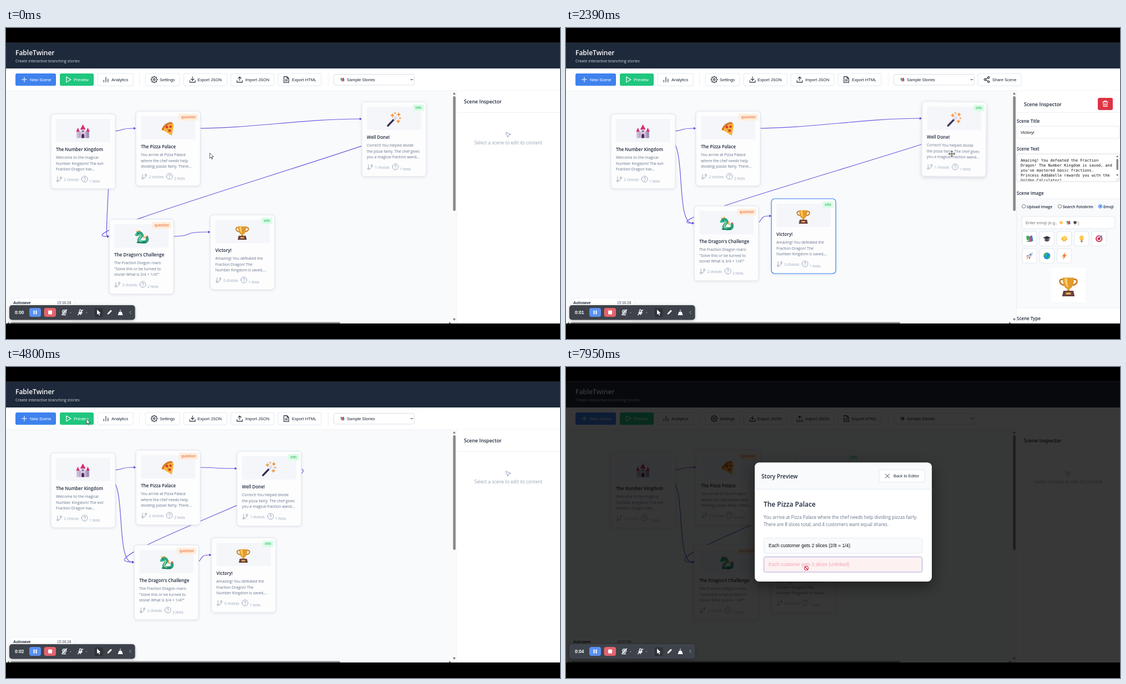
An HTML page that plays this animation: 998x561 px, repeating every 8 s.

```html
<!DOCTYPE html>
<html lang="en">
<head>
<meta charset="utf-8">
<title>Story editor</title>
<style>
html, body { margin: 0; width: 100%; height: 100%; overflow: hidden; background: #000; }
svg { display: block; width: 998px; height: 561px; }
text { font-family: "Open Sans", "Noto Sans", sans-serif; white-space: pre; }
.ui { font-family: "Liberation Sans", Arial, sans-serif; }
.mono { font-family: "DejaVu Sans Mono", monospace; }
.card.on .frame { stroke: #3b82f6; stroke-width: 1.2; }
.choice.hover rect { stroke: #7fb0ee; fill: #eff7fc; }
.choice.dead rect { fill: #fdf1f2; }
.choice.dead.hover rect { stroke: #a9a9d6; }
.modal { filter: drop-shadow(0 8px 12px rgba(0, 0, 0, .45)); }
.bar { filter: drop-shadow(0 1px 2px rgba(0, 0, 0, .3)); }
</style>
</head>
<body>
<svg id="stage" viewBox="0 0 998 561"></svg>
<script>
const INK = '#1e293b', GRAY = '#64748b', PALE = '#94a3b8', LINE = '#e2e8f0';
const LOOP = 8000;

// Drawing helpers
const text = (x, y, s, size, fill = INK, more = '') =>
  `<text x="${x}" y="${y}" font-size="${size}" fill="${fill}" ${more}>${s}</text>`;
const bold = (x, y, s, size, fill = INK) => text(x, y, s, size, fill, 'font-weight="600"');
const ui = (x, y, s, size = 7.5, fill = INK, more = '') => text(x, y, s, size, fill, `class="ui" ${more}`);
const rect = (x, y, w, h, fill, r = 0, stroke = 'none', more = '') =>
  `<rect x="${x}" y="${y}" width="${w}" height="${h}" rx="${r}" fill="${fill}" stroke="${stroke}" ${more}/>`;
const path = (d, fill, stroke = 'none', w = 1) =>
  `<path d="${d}" fill="${fill}" stroke="${stroke}" stroke-width="${w}" stroke-linecap="round" stroke-linejoin="round"/>`;
const dot = (x, y, r, fill, stroke = 'none') => `<circle cx="${x}" cy="${y}" r="${r}" fill="${fill}" stroke="${stroke}"/>`;
const ring = (x, y, r) => `M${x - r} ${y}a${r} ${r} 0 1 0 ${2 * r} 0a${r} ${r} 0 1 0 ${-2 * r} 0`;
const place = (x, y, k, body) => `<g transform="translate(${x} ${y}) scale(${k})">${body}</g>`;

const gear = 'M' + Array.from({ length: 32 }, (_, i) => {
  const a = (i - .5) * Math.PI / 16, r = i % 4 < 2 ? 10.5 : 8;
  return `${(12 + r * Math.cos(a)).toFixed(1)} ${(12 + r * Math.sin(a)).toFixed(1)}`;
}).join('L') + 'z';
const icons = {
  plus: 'M12 4v16M4 12h16',
  play: 'M6 3l15 9-15 9z',
  bars: 'M19 20V10M12 20V4M5 20v-6',
  gear: gear + ring(12, 12, 3),
  down: 'M12 3v12M7 10l5 5 5-5M3 15v6h18v-6',
  up: 'M12 15V3M7 8l5-5 5 5M3 15v6h18v-6',
  file: 'M14 2H4v20h16V8zM14 2v6h6M8 13h8M8 17h8',
  share: ring(18, 5, 3) + ring(6, 12, 3) + ring(18, 19, 3) + 'M8.6 13.5l6.8 4M15.4 6.5l-6.8 4',
  trash: 'M3 6h18M8 6V3h8v3M5 6l1 15h12l1-15M10 11v6M14 11v6',
  cross: 'M4 4l16 16M20 4L4 20',
  branch: 'M6 3v12M18 9a9 9 0 01-9 9' + ring(18, 6, 3) + ring(6, 18, 3),
  help: ring(12, 12, 10) + 'M9 9a3 3 0 116 1c0 2-3 2-3 4M12 17v.5',
  pointer: 'M3 3l7 17 2.5-7.5L20 10z',
  caret: 'M5 9l7 7 7-7',
  left: 'M15 5l-7 7 7 7',
  camera: ring(12, 10, 7) + ring(12, 10, 2.5) + 'M7 21h10M3 21L21 2',
  mic: 'M9 5a3 3 0 016 0v6a3 3 0 01-6 0zM6 11a6 6 0 0012 0M12 17v4M3 21L21 3'
};
const icon = (name, x, y, size = 12, color = INK, w = 2) =>
  place(x - size / 2, y - size / 2, size / 24, path(icons[name], 'none', color, w));

// Small pictures, drawn around 0,0 in a 32 unit box
const pics = {
  castle: rect(-12, 0, 24, 14, '#b8aac6') + rect(-5, -6, 10, 20, '#d5cadf') + rect(-14, -1, 6, 15, '#cabdd6') +
    rect(8, -1, 6, 15, '#a493b8') + path('M0-16l6 11H-6zM-11-9l4 9h-8zM11-9l4 9H7z', '#dc2f72') +
    path('M-3 14V8a3 3 0 016 0v6z', '#4c2a66') + dot(0, -1, 1.6, '#59377a'),
  pizza: path('M-13 1C-9-9 0-14 9-14l4 5-4 24z', '#f9b437') + path('M-14 2C-10-10 0-16 9-15l2 4C1-12-7-6-10 4z', '#d9782b') +
    dot(-2, -4, 3, '#d53b35') + dot(6, -5, 2.8, '#d53b35') + dot(4, 4, 3, '#d53b35') + dot(0, 1, 1, '#41a35a'),
  wand: path('M-13 14L5-5', 'none', '#37264f', 4) + path('M1-1l5-5', 'none', '#e8dff4', 4) +
    [[-3, -9, 1], [11, -11, 1], [10, 4, 1], [3, -14, .6], [14, -3, .6]].map(([x, y, k]) =>
      place(x, y, k, path('M0-5l1.5 3.5L5 0 1.5 1.5 0 5-1.5 1.5-5 0-1.5-1.5z', '#f4953f'))).join(''),
  dragon: path('M-9-10l-3-4 6 1 1-3 5 5zM2-4l5-2-1 5 4 1-4 3z', '#f4a13c') +
    path('M-8-8C0-12 4-5-1 0S-8 10 1 11s14-1 12-9', 'none', '#2ba37d', 6.5) + path('M-8 12h18', 'none', '#198268', 3.5) +
    path('M-5-5C0-6 1-2-2 1s-5 8 3 9', 'none', '#9bdc9a', 2) + path('M-14-6l7-5 5 3-2 5-8 1z', '#35b48a') +
    dot(-7, -8, 1.2, '#15354a') + path('M13 2l-2-5 5 1z', '#df4b56'),
  trophy: path('M-8-11c-9-2-7 9 2 9M8-11c9-2 7 9-2 9', 'none', '#c97f22', 2.5) +
    path('M-9-14H9C9-3 6 3 2 4v5h-4V4c-4-1-7-7-7-18z', '#e39b2c') + path('M-6-13h4c0 7 1 11 2 15-4-2-6-8-6-15z', '#fbcf6c') +
    path('M-8 7H8l2 9H-10z', '#6a3f3d') + rect(-4, 10, 8, 3, '#e8b658'),
  books: path('M-14-10l10-3 6 24-11 3z', '#3caa61') + path('M-2-10H8V13H-2z', '#e74856') +
    path('M4-12l7-1 4 22-9 3z', '#2b83d8') + path('M-12 9l9-3', 'none', '#fff', 3),
  cap: path('M0-11L16-4 0 4-16-4z', '#393444') + path('M-9 0v8c5 5 13 5 18 0V0L0 4z', '#544b62') + path('M12-4v11', 'none', '#e9a63a', 2.5),
  star: path('M0-14L4-6 12-9 9-2 15 3 7 5 6 13 0 9-6 13-7 5-15 3-9-2-12-9-4-6z', '#fbb735') + dot(0, 0, 5, '#ffdf69'),
  bulb: dot(0, -4, 9, '#ffc94d') + path('M-5 3H5L4 9H-4z', '#f0a63a') + rect(-4, 9, 8, 6, '#8a8796', 2),
  target: dot(0, 0, 14, '#d52e4c') + dot(0, 0, 9.5, '#fff') + dot(0, 0, 6, '#d52e4c') + path('M0 0L12-12', 'none', '#287bc9', 3),
  rocket: path('M14-14C3-14-5-6-8 3l5 5C6 5 14-3 14-14z', '#cfcbdc') + path('M-5-4l-9 5 6 2zM4 5l-5 9-2-6z', '#d83756') +
    path('M-8 4l-6 10 10-6z', '#f6a22f') + dot(4, -5, 3, '#3184cf'),
  globe: dot(0, 0, 14, '#238ede') + path('M-10-9C-3-16 6-12 3-7L-3-3l1 6-5 3-6-7zM5 0l8 1-4 9-5 1z', '#36b56a'),
  bolt: path('M4-15L-9 3h7l-4 13L10-4H2z', '#f87532')
};
const pic = (name, x, y, size) => place(x, y, size / 32, pics[name]);

// Story content
const hero = 'Princess Addabelle';
const scenes = {
  castle: { x: 81, y: 155, title: 'The Number Kingdom', choices: 2, hints: 1,
    lines: ['Welcome to the magical', 'Number Kingdom! The evil', 'Fraction Dragon has...'] },
  pizza: { x: 234, y: 150, title: 'The Pizza Palace', tag: 'question', choices: 2, hints: 2,
    lines: ['You arrive at Pizza Palace', 'where the chef needs help', 'dividing pizzas fairly. There...'] },
  wand: { x: 641, y: 133, title: 'Well Done!', tag: 'info', choices: 1, hints: 1,
    lines: ['Correct! You helped divide', 'the pizza fairly. The chef gives', 'you a magical fraction wand...'] },
  dragon: { x: 186, y: 345, title: "The Dragon's Challenge", tag: 'question', choices: 2, hints: 2,
    lines: ['The Fraction Dragon roars:', '"Solve this or be turned to', 'stone! What is 3/4 + 1/4?"'],
    full: ['The Fraction Dragon roars: "Solve this or', 'be turned to stone! What is 3/4 + 1/4?"'] },
  trophy: { x: 368, y: 337, title: 'Victory!', tag: 'info', choices: 0, hints: 1,
    lines: ['Amazing! You defeated the', 'Fraction Dragon! The', 'Number Kingdom is saved,...'],
    full: ['Amazing! You defeated the Fraction', 'Dragon! The Number Kingdom is saved, and', "you've mastered basic fractions.",
      `${hero} rewards you with the`, 'Golden Calculator!'] }
};
const links = [['castle', 'pizza', 31], ['castle', 'dragon', 48], ['pizza', 'wand', 31], ['wand', 'dragon', 31], ['dragon', 'trophy', 31]];

function card(id) {
  const s = scenes[id];
  const [tagX, tagFill, tagInk] = s.tag === 'info' ? [92, '#dcfce7', '#35bd6c'] : [77, '#ffeddc', '#ea7440'];
  return `<g id="${id}" class="card">` + rect(0, 0, 116, 135, '#fdfdfe', 6, '#dfe4ee', 'class="frame"') +
    rect(9, 9, 98, 42, '#f4f6fa', 3) + pic(id, 57.5, 32, 26) +
    (s.tag ? rect(tagX, 5, 112 - tagX, 12, tagFill, 3) +
      text((tagX + 112) / 2, 13.2, s.tag, 6.2, tagInk, 'font-weight="600" text-anchor="middle"') : '') +
    bold(9, 66.6, s.title, 8) + s.lines.map((l, i) => text(9, 81.3 + i * 10.4, l, 6.9, GRAY)).join('') +
    icon('branch', 15, 118, 12, PALE, 1.8) + text(23.5, 121, s.choices + ' choices', 6.2, PALE) +
    icon('help', 60.5, 117.5, 13, PALE, 1.8) + text(69, 124, s.hints + ' hints', 6.2, PALE) + '</g>';
}

const button = (x, w, name, label, iconX, labelX, fill = '#fff', ink = INK) =>
  rect(x, 82, w, 22.3, fill, 3, fill === '#fff' ? LINE : 'none') + icon(name, iconX, 93, 13, ink) + ui(labelX, 95.6, label, 7.5, ink);

function inspector(id) {
  const s = scenes[id];
  const radio = (x, label, on) => dot(x, 321.7, 3.2, '#fff', on ? '#2a72e8' : '#777') +
    (on ? dot(x, 321.7, 1.8, '#2a72e8') : '') + bold(x + 5.5, 324.5, label, 6.9);
  const choices = ['books', 'cap', 'star', 'bulb', 'target', 'rocket', 'globe', 'bolt'].map((n, i) => {
    const x = 822 + i % 5 * 31.3, y = i < 5 ? 367 : 398;
    return rect(x, y, 26, 26, '#fff', 3, LINE) + pic(n, x + 13, y + 13, 14);
  }).join('');
  return `<g id="edit-${id}">` + bold(825, 141, 'Scene Inspector', 8.9) +
    rect(958, 126, 27, 22, '#df3344', 3) + icon('trash', 971.5, 136.5, 13, '#fff') +
    bold(812, 170.5, 'Scene Title', 8) + rect(812, 177, 185.5, 22, '#fff', 3, LINE) + ui(819, 190.6, s.title, 7.5, '#111') +
    bold(812, 221, 'Scene Text', 8) + rect(812, 227, 185.5, 50, '#fff', 3, '#d8dde6') +
    `<g clip-path="url(#area)">${s.full.map((l, i) => text(819, 241.2 + i * 9, l, 6.85, '#111', 'class="mono"')).join('')}</g>` +
    (s.full.length > 4 ? rect(991.5, 236, 3.5, 20, '#8a8a8a', 1.7) + path('M991 233h4l-2-3zM991 264h4l-2 3z', '#666') : '') +
    path('M991 275l4-4M994 275l1-1', 'none', '#999', .6) +
    bold(812, 301, 'Scene Image', 8) + rect(812, 308, 190, 197, '#f8fafc', 4, '#edf0f6') +
    radio(824.5, 'Upload Image') + radio(889.5, 'Search Fotobrim') + radio(962.5, 'Emoji', true) +
    rect(821, 340, 167.5, 22, '#fff', 3, LINE) + ui(828, 353.7, 'Enter emoji (e.g.,', 7.5, '#777') +
    pic('star', 892, 351, 8) + pic('books', 905, 351, 8) + pic('cap', 917, 351, 8) + ui(922, 353.7, ')', 7.5, '#777') +
    choices + rect(874, 433, 62, 62, '#fff', 3) + pic(id, 905, 466, 36) + bold(812, 526.5, 'Scene Type', 8) +
    button(742, 78, 'share', 'Share Scene', 758, 768) + '</g>';
}

function modal(id, top, height, lines, options, firstY) {
  const row = ([label, dead], i) => {
    const y = firstY + i * 34;
    return `<g class="choice ${dead ? 'dead' : ''}" data-y="${y}">` + rect(356.5, y, 285, 27.5, '#f8fafc', 3, '#e6eaf2') +
      ui(365, y + 16.2, label, 8.5, dead ? '#f2a3b0' : '#111') + '</g>';
  };
  return `<g id="play-${id}" class="modal">` + rect(340, top, 319, height, '#fff', 8) +
    path(`M340 ${top + 48}v-40a8 8 0 018-8h303a8 8 0 018 8v40z`, '#f8fafc') + path(`M340 ${top + 48}h319`, 'none', LINE) +
    bold(352, top + 28, 'Story Preview', 10) + rect(564, top + 13, 82, 22, '#fff', 3, LINE) +
    icon('cross', 579, top + 24, 11) + ui(590, top + 26.6, 'Back to Editor', 7.4) +
    bold(356, top + 79, scenes[id].title, 11.95) +
    lines.map((l, i) => text(356, top + 101.2 + i * 13.6, l, 8.15, GRAY)).join('') + options.map(row).join('') + '</g>';
}

const arrow = 'M0 0v9l2.2-2 1.6 3.6 1.5-.7-1.6-3.4h3z';
const cross = 'M0-5.5V5.5M-5.5 0H5.5M-2-3.5l2-2 2 2M-2 3.5l2 2 2-2M-3.5-2l-2 2 2 2M3.5-2l2 2-2 2';
const cursors = {
  arrow: path(arrow, '#fff', '#333', .8),
  move: path(cross, 'none', '#fff', 2.6) + path(cross, 'none', '#333', 1),
  hand: path('M-1 1a1 1 0 012 0v4l4 1q2 .5 1.5 2.5L5.5 12H0L-3.5 7.5q0-1.5 1.5-1L-1 7.5z', '#fff', '#333', .8),
  no: dot(0, 0, 3.6, '#fff8', '#c8102e') + path('M-2.5-2.5L2.5 2.5', 'none', '#c8102e', 1.3)
};

const canvas = rect(0, 26.5, 998, 506.5, '#f9fafc') +
  links.map((_, i) => `<path id="link${i}" fill="none" stroke="#6a5ce0" stroke-width="1.2" marker-end="url(#tip)"/>`).join('') +
  Object.keys(scenes).map(card).join('');

const toolbar = rect(0, 26.5, 998, 46.5, INK) + bold(17, 49, 'FableTwiner', 12, '#fff') +
  text(17, 62, 'Create interactive branching stories', 7, '#d5dae2') +
  rect(0, 73, 998, 40, '#fff') + path('M0 113h998M240.5 82v22M580.5 82v22', 'none', '#eceff4') +
  button(17, 73, 'plus', 'New Scene', 33, 43, '#3f82ee', '#fff') + button(97, 61, 'play', 'Preview', 112, 122, '#20c67e', '#fff') +
  button(165, 64, 'bars', 'Analytics', 180, 190) + button(251, 62, 'gear', 'Settings', 267, 277) +
  button(320, 78, 'down', 'Export JSON', 336, 345) + button(405, 78, 'up', 'Import JSON', 421, 431) +
  button(490, 78, 'file', 'Export HTML', 505, 515) +
  rect(590.5, 83.5, 145, 19.5, '#fff', 3, '#d9dee6') + pic('books', 606, 93, 8) + ui(614, 95.6, 'Sample Stories') + icon('caret', 731, 93, 6, INK, 4);

const sidebar = rect(812, 113, 186, 420, '#fff') + path('M811.5 113v420M812 152.5h186', 'none', '#eef1f5') +
  '<g id="empty">' + bold(825, 136, 'Scene Inspector', 8.9) + icon('pointer', 905, 193, 12, PALE) +
  text(905, 210, 'Select a scene to edit its content', 8.2, PALE, 'text-anchor="middle"') + '</g>' +
  inspector('dragon') + inspector('trophy');

const autosave = rect(8, 487, 114, 46, '#fff', 4, '#eef1f5') + ui(13, 498.3, 'Autosave', 7, INK, 'font-weight="700"') +
  '<text id="saved" class="ui" x="92" y="498.3" font-size="6.5" fill="#475569"></text>';

const scrollbars = rect(803, 113, 8, 420, '#fafafa') + rect(805.3, 123, 4.7, 207, '#8b8b8b', 2.3) +
  path('M805 120h5l-2.5-4zM805 524h5l-2.5 4z', '#777') +
  rect(8, 530.5, 594, 4, '#8b8b8b', 2) + path('M6 530v4l-4-2zM798 530v4l4-2z', '#777');

const preview = '<g id="veil">' + rect(0, 26.5, 998, 506.5, '#000', 0, 'none', 'opacity=".78"') +
  modal('castle', 166, 227.5, ['Welcome to the magical Number Kingdom! The evil Fraction Dragon has',
    `scattered all the numbers. You must help ${hero} restore order`, 'using your math skills.'],
    [['Start with simple fractions (1/2, 1/4)'], ["Go directly to the dragon's lair"]], 315) +
  modal('pizza', 172.5, 214.5, ['You arrive at Pizza Palace where the chef needs help dividing pizzas fairly.',
    'There are 8 slices total, and 4 customers want equal shares.'],
    [['Each customer gets 2 slices (2/8 = 1/4)'], ['Each customer gets 3 slices (unlinked)', true]], 308.5) + '</g>';

const recorder = rect(6, 500, 226.5, 26.5, '#3e434b', 5, 'none', 'class="bar"') +
  '<text id="clock" class="ui" x="16" y="516" font-size="8.2" font-weight="700" fill="#fff"></text>' +
  rect(42, 505, 21, 16, '#5a91f2', 4) + rect(49.5, 509.5, 2, 7, '#fff') + rect(53.5, 509.5, 2, 7, '#fff') +
  rect(68.5, 505, 21.5, 16, '#e4636d', 4) + rect(76, 509.5, 7, 7, '#fff', 1) +
  icon('camera', 105, 513, 12, '#fff', 2.5) + icon('caret', 116.5, 513.5, 4, '#bbb', 4) +
  icon('mic', 134, 513, 12, '#fff', 2.5) + icon('caret', 145, 513.5, 4, '#bbb', 4) +
  rect(159.5, 505.5, 15, 16, '#2f3238', 3) + place(164, 508, 1, path(arrow, '#fff')) +
  path('M182.5 517l.8-3 5.5-5.5 2 2-5.5 5.5z', '#fff') + path('M205.5 508h1v4h2l2 6h-9l2-6h2z', '#fff') + icon('left', 224, 513, 9, '#ccc');

document.getElementById('stage').innerHTML = `<defs>
  <clipPath id="area"><rect x="813" y="228" width="176" height="48"/></clipPath>
  <marker id="tip" markerUnits="userSpaceOnUse" markerWidth="5" markerHeight="5" refX="0" refY="2.5" orient="auto">
    <path d="M0 0L4.5 2.5 0 5z" fill="#5f52e0"/></marker></defs>` +
  canvas + toolbar + sidebar + autosave + scrollbars + preview +
  rect(0, 533, 998, 28, '#000') + rect(0, 0, 998, 26.5, '#000') + recorder + '<g id="cursor"></g>';

// Motion
const $ = id => document.getElementById(id);
const show = (id, on) => $(id).style.display = on ? '' : 'none';
const clamp = (v, a = 0, b = 1) => Math.min(b, Math.max(a, v));
const ease = u => u * u * (3 - 2 * u);
const latest = (steps, t) => steps.filter(s => s[0] <= t).pop()[1];

const mouse = [[0, 367, 226], [60, 367, 226], [380, 250, 377], [605, 250, 377], [715, 295, 353], [1080, 295, 353],
  [1450, 430, 364], [1700, 430, 364], [1980, 432, 335], [2040, 432, 335], [2290, 695, 228], [2340, 695, 228], [2390, 695, 227],
  [3330, 470, 247], [3450, 470, 247], [3880, 580, 366], [4260, 580, 366], [4760, 145, 94], [5520, 145, 94], [5800, 330, 190],
  [6100, 470, 262], [6450, 420, 331], [7250, 420, 331], [7700, 433, 363], [LOOP, 433, 363]];
const drags = { dragon: [605, 860], trophy: [1700, 2020], wand: [2340, 3400] };
const pointerKinds = [[0, 'arrow'], [290, 'move'], [1120, 'arrow'], [1330, 'move'], [2080, 'arrow'], [2220, 'move'],
  [3500, 'arrow'], [6380, 'hand'], [7500, 'no']];
const picked = [[0, ''], [420, 'dragon'], [1520, 'trophy'], [3950, '']];
const clock = [[0, '0:00'], [2350, '0:01'], [4000, '0:02'], [5650, '0:03'], [7300, '0:04']];

function mouseAt(t) {
  const i = Math.max(1, mouse.findIndex(k => k[0] >= t));
  const [a, b] = [mouse[i - 1], mouse[i]], u = ease(clamp((t - a[0]) / (b[0] - a[0])));
  return [a[1] + (b[1] - a[1]) * u, a[2] + (b[2] - a[2]) * u];
}
function sceneAt(id, t) {
  const { x, y } = scenes[id], span = drags[id];
  if (!span) return [x, y];
  const from = mouseAt(span[0]), now = mouseAt(clamp(t, ...span));
  return [x + now[0] - from[0], y + now[1] - from[1]];
}

function draw(t) {
  const chosen = latest(picked, t), [mx, my] = mouseAt(t);
  for (const id in scenes) {
    // Cards trail the pointer a little; the links do not
    const [x, y] = sceneAt(id, t - 80), [grab, drop] = drags[id] || [LOOP, LOOP];
    const lift = ease(clamp((t - grab) / 130)) * (1 - ease(clamp((t - drop) / 150)));
    const held = t >= grab && t < drop && id !== 'trophy';
    $(id).setAttribute('transform', `translate(${x} ${y}) rotate(${2 * lift} 58 67)`);
    $(id).setAttribute('class', chosen === id && !held ? 'card on' : 'card');
    $(id).style.filter = `drop-shadow(0 ${1 + 3 * lift}px ${2 + 3 * lift}px rgba(30, 41, 59, ${.1 + .15 * lift}))`;
  }
  links.forEach(([a, b, dy], i) => {
    const [ax, ay] = sceneAt(a, t), [bx, by] = sceneAt(b, t);
    const x1 = ax + 106, y1 = ay + dy, x2 = bx - 4, y2 = by + 31, k = Math.min(100, Math.abs(x2 - x1) * .75);
    $('link' + i).setAttribute('d', `M${x1} ${y1}C${x1 + k} ${y1} ${x2 - k} ${y2} ${x2} ${y2}`);
  });
  show('empty', !chosen);
  show('edit-dragon', chosen === 'dragon');
  show('edit-trophy', chosen === 'trophy');

  const fade = ease(clamp((t - 4820) / 200)), next = t >= 6760;
  show('veil', fade > 0);
  $('veil').style.opacity = fade;
  show('play-castle', !next);
  show('play-pizza', next);
  document.querySelectorAll('.choice').forEach(c => {
    const y = +c.dataset.y;
    c.classList.toggle('hover', t > 5500 && mx > 356 && mx < 642 && my + 2 > y && my + 2 < y + 27.5);
  });
  $('clock').textContent = latest(clock, t);
  $('saved').textContent = t < 4900 ? '15:36:28' : '15:37:45';
  $('cursor').innerHTML = place(mx, my, 1, cursors[latest(pointerKinds, t)]);
}

function tick() {
  draw(performance.now() % LOOP);
  requestAnimationFrame(tick);
}
tick();
</script>
</body>
</html>
```
